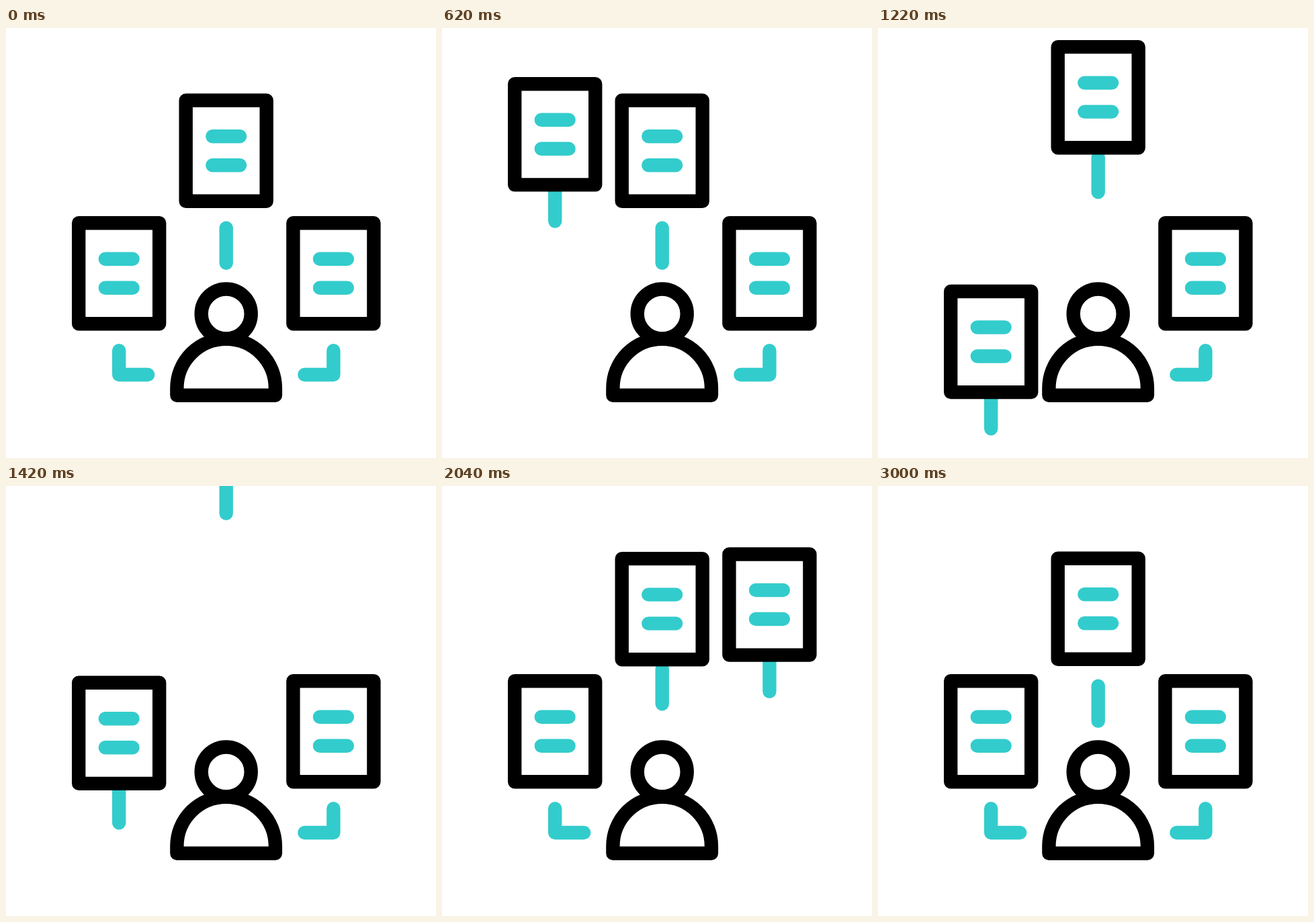
Write an HTML page with a canvas that moves like this. It is 640 by 640 pixels and loops after 3.02 s.

```html
<!DOCTYPE html>
<html lang="en">
<head>
<meta charset="utf-8">
<title>Document flow</title>
<style>
  html, body { margin: 0; width: 100%; height: 100%; overflow: hidden; background: #fff; }
  canvas { display: block; }
</style>
</head>
<body>
<canvas id="stage" width="640" height="640"></canvas>
<script>
const ctx = document.getElementById('stage').getContext('2d');
const LOOP = 3020, CYAN = '#33cccc', CENTER = 327.7, LINK_TOP = 240;

// leave / land: start of the exit and end of the return; grow: when the link slides out again
const docs = [
  { x: 168.2, y: 182.5, side: 1, leave: 124, land: 1504, grow: 1374, out: .0119, back: .0165 },
  { x: CENTER, y: 0, side: 0, leave: 841, land: 2079, grow: 2050, out: .01132, back: .02 },
  { x: 487.4, y: 182.5, side: -1, leave: 1559, land: 2830, grow: 2700, out: .0119, back: .0165 }
];

const ease = (t, from, to) => {
  const x = Math.min(1, Math.max(0, (t - from) / (to - from)));
  return x * x * (3 - 2 * x);
};

function stroke(color, path, fill) {
  ctx.strokeStyle = color;
  if (fill) {
    ctx.fillStyle = '#fff';
    ctx.fill(path);
  }
  ctx.stroke(path);
}

// Rises out of the top, then comes back from below
function docShift(d, t) {
  return t < d.leave + 700
    ? -(Math.max(0, d.out * (t - d.leave)) ** 3)
    : Math.max(0, d.back * (d.land - t)) ** 3;
}

// The link slides along its own path until it is tucked under the page
function drawLink(d, t) {
  const hide = ease(t, d.leave + 65, d.leave + 395) - ease(t, d.grow, d.grow + 300);
  const corner = d.side ? 333.5 : 349.8;
  const length = corner - LINK_TOP + (d.side ? 43 : 0);
  const start = 57.6 - hide * (d.side ? 50 : 26);
  const end = length - hide * (d.side ? 64.6 : 26);
  const path = new Path2D(`M0 ${LINK_TOP}V${corner}` + (d.side ? `H${43 * d.side}` : ''));
  ctx.setLineDash([end - start, 999]);
  ctx.lineDashOffset = -start;
  stroke(CYAN, path);
  ctx.setLineDash([]);
}

const page = new Path2D('M-60 107.7H60V257.8H-60Z');
const lines = new Path2D('M-20.4 161.2H20.4M-20.4 204.2H20.4');
const body = new Path2D('M254.4 546.7V536a73.25 73.25 0 0 1 146.5 0V546.7Z');

function drawDoc(d, t) {
  ctx.save();
  ctx.translate(d.x, d.y + docShift(d, t));
  drawLink(d, t);
  stroke('#000', page, true);
  stroke(CYAN, lines);
  ctx.restore();
}

// The head leans towards the side page that is leaving
function drawPerson(t) {
  const lean = from => ease(t, from, from + 250) - ease(t, from + 280, from + 530);
  const head = new Path2D();
  head.arc(CENTER + 38.5 * (lean(1455) - lean(20)), 425.5, 37, 0, 7);
  stroke('#000', head, true);
  stroke('#000', body, true);
}

function draw() {
  const t = performance.now() % LOOP;
  ctx.clearRect(0, 0, 640, 640);
  ctx.lineWidth = 20.4;
  ctx.lineCap = ctx.lineJoin = 'round';
  docs.forEach(d => drawDoc(d, t));
  drawPerson(t);
  requestAnimationFrame(draw);
}
draw();
</script>
</body>
</html>
```
